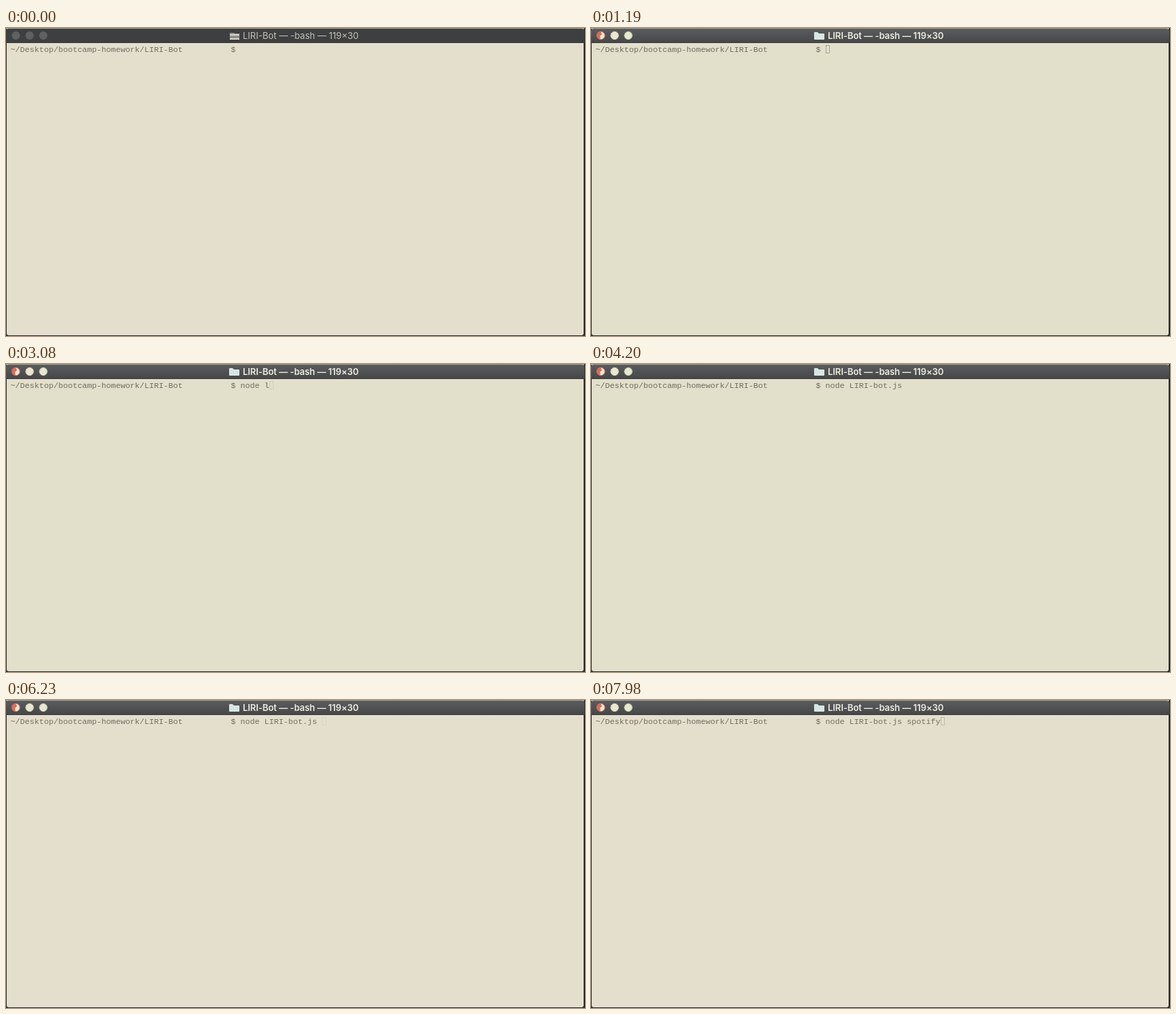
Recreate the animation shown at these times as an HTML page. Size 846 by 450 pixels, loop 8 s.

```html
<!DOCTYPE html>
<html lang="en">
<head>
<meta charset="utf-8">
<title>Terminal</title>
<style>
  html, body { margin: 0; width: 100%; height: 100%; overflow: hidden; background: #292a2b; }
  svg { display: block; width: 846px; height: 450px; }
  .mono { font: 11.667px "Liberation Mono", monospace; fill: #716c5f; white-space: pre; }
  .title { font: 13px Inter, sans-serif; fill: #c3c2b7; }
  .active .title { font-weight: 600; fill: #eeecdf; letter-spacing: -.07px; }
  .on, .active .off { display: none; }
  .active .on { display: inline; }
</style>
</head>
<body>
<svg id="win" viewBox="0 0 846 450">
  <defs>
    <linearGradient id="bar" x2="0" y2="1">
      <stop stop-color="#5b5c5e"/>
      <stop offset="1" stop-color="#454648"/>
    </linearGradient>
  </defs>

  <path id="page" d="M1 0H844V446q0 3-3 3H4q-3 0-3-3Z"/>
  <rect width="845" height="1" fill="#aaa797"/>

  <g class="off">
    <path d="M0 22V5q0-4 4-4H841q4 0 4 4V22Z" fill="#3d3f40"/>
    <g fill="#5e6061">
      <circle cx="14.5" cy="11" r="6"/>
      <circle cx="34.5" cy="11" r="6"/>
      <circle cx="54.5" cy="11" r="6"/>
    </g>
    <path d="M327 7h6l1 1h7v9h-14Z" fill="#8f9089"/>
    <path d="M327 10h14M327 16h14" stroke="#d9d7c8" stroke-width="2"/>
  </g>

  <g class="on">
    <path d="M0 22V5q0-4 4-4H841q4 0 4 4V22Z" fill="url(#bar)"/>
    <g fill="#eae6d3">
      <circle cx="14.5" cy="11" r="5.7" stroke="#c98073"/>
      <circle cx="34.5" cy="11" r="5.7" stroke="#dccfa8"/>
      <circle cx="54.5" cy="11" r="5.7" stroke="#b7d3a0"/>
    </g>
    <path d="M14 5a6 6 0 0 0 0 12l-1-5 3-3Z" fill="#dd6a58"/>
    <path d="M326 7q0-1 1-1h4l2 2h7q1 0 1 1v7q0 1-1 1h-13q-1 0-1-1Z" fill="#d7e6e3"/>
  </g>

  <path d="M0 21.5H845" stroke="#38393a"/>
  <text class="title" x="346" y="16">LIRI-Bot — -bash — 119×30</text>
  <text class="mono" x="6.5" y="35">~/Desktop/bootcamp-homework/LIRI-Bot</text>
  <text class="mono" x="328.5" y="35">$</text>
  <text class="mono" x="342.5" y="35" id="command"></text>
  <rect id="cursor" y="25.5" width="5" height="11" fill="none" stroke="#8d8879" stroke-dasharray="2 1"/>
</svg>

<script>
  const LOOP = 8000, ACTIVE = 980, COMPLETE = 3850, BLINK = 1600;
  const [win, page, command, cursor] =
    ["win", "page", "command", "cursor"].map(id => document.getElementById(id));

  // The part of a text typed by time t, one key per step.
  const type = (text, t, start, step) =>
    text.slice(0, Math.max(0, Math.floor((t - start) / step) + 1));

  // Tab replaces the half-typed name with the full file name.
  function line(t) {
    return t < COMPLETE
      ? type("node ", t, 1820, 140) + type("liri", t, 3010, 140)
      : "node LIRI-bot.js " + type("spotify", t, 6370, 190);
  }

  // A soft blink whose phase restarts in the pause after the first word.
  function opacity(t) {
    if (t < ACTIVE) return 0;
    const peak = t < 2450 ? 1400 : 3550;
    const wave = .5 + .8 * Math.cos((t - peak) / BLINK * 2 * Math.PI);
    return Math.min(1, Math.max(0, wave));
  }

  function draw(now) {
    const t = now % LOOP, text = line(t);
    win.classList.toggle("active", t >= ACTIVE);
    page.setAttribute("fill", t >= ACTIVE && t < 5600 ? "#e2dfcb" : "#e4dfcc");
    command.textContent = text;
    cursor.setAttribute("x", 343.5 + 7 * text.length);
    cursor.setAttribute("opacity", opacity(t));
    requestAnimationFrame(draw);
  }
  draw(performance.now());
</script>
</body>
</html>
```
